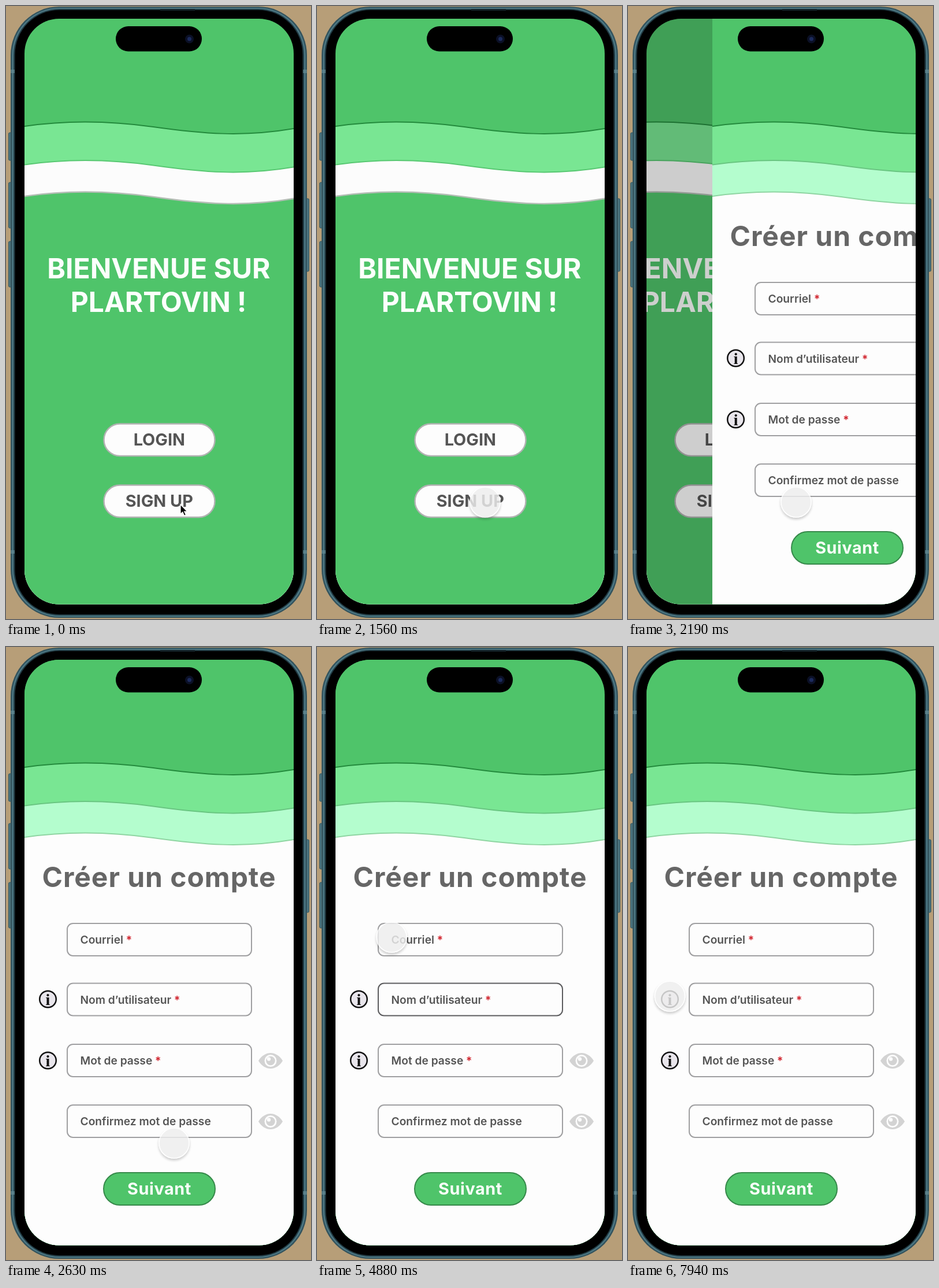
Animation, 528 px wide and 1060 px high, one loop 8000 ms. Source, as an HTML page:

```html
<!DOCTYPE html>
<html lang="fr">
<head>
<meta charset="utf-8">
<style>
html, body { margin: 0; width: 100%; height: 100%; overflow: hidden; background: #b79e78; }
svg { display: block; width: 528px; height: 1060px; font: 600 19.2px Inter, sans-serif; }
.mid { text-anchor: middle; font-weight: 700; }
.wide { letter-spacing: .02em; }
.big { font-size: 48px; }
.btn { font-size: 28.8px; }
.small { font-size: 15px; font-weight: 700; }
.red { fill: #d0202a; }
.pill { fill: #fdfdfd; stroke: #b2b2b2; stroke-width: 2.5; }
.box { fill: none; stroke-width: 2; }
</style>
</head>
<body>
<svg viewBox="0 0 528 1060">
  <defs>
    <clipPath id="screen"><rect x="32" y="22" width="466" height="1012.5" rx="60"/></clipPath>
    <path id="wave" d="M30 208.3L32 208C100 198 170 197 255 209S410 227 498 212L500 211.7V1100H30Z"/>
    <filter id="shade" x="-30%" y="-30%" width="160%" height="170%">
      <feDropShadow dx="0" dy="3" stdDeviation="2" flood-color="#000" flood-opacity=".25"/>
    </filter>
    <g id="info">
      <circle r="14.3" fill="#e9e6ec" stroke="#111" stroke-width="2.5"/>
      <text y="9.5" text-anchor="middle" font-family="Liberation Serif, serif" font-size="28" font-weight="700" fill="#111">i</text>
    </g>
    <g id="eye">
      <path d="M-21 0C-10 -18 10 -18 21 0C10 18 -10 18 -21 0Z" fill="#d3d3d3"/>
      <circle r="10.5" fill="#fdfdfd"/>
      <circle r="7.8" fill="#d3d3d3"/>
      <circle cx="-3" cy="-3" r="3.2" fill="#fdfdfd"/>
    </g>
  </defs>

  <g fill="#4b737e" stroke="#35565f">
    <rect x="4.5" y="219" width="7" height="48" rx="2"/>
    <rect x="4.5" y="305" width="7" height="79" rx="2"/>
    <rect x="4.5" y="407" width="7" height="79" rx="2"/>
    <rect x="517" y="333" width="7.5" height="126" rx="2"/>
  </g>
  <rect x="8" y="1" width="513" height="1057" rx="84" fill="#33535d"/>
  <rect x="10.5" y="3" width="508" height="1053" rx="82" fill="#4d7884"/>
  <rect x="13" y="5" width="503" height="1049" rx="80" fill="#223c45"/>
  <path d="M8 113H15M514 113H521M8 944H15M514 944H521" stroke="#6b919a" stroke-width="6" opacity=".6"/>
  <rect x="15.5" y="7" width="498" height="1045" rx="77"/>

  <g clip-path="url(#screen)">
    <g id="welcome">
      <rect x="30" y="20" width="470" height="1016" fill="#4fc46a"/>
      <use href="#wave" fill="#79e693" stroke="#238a3c" stroke-width="2"/>
      <use href="#wave" y="66.5" fill="#fcfcfc" stroke="#58c872" stroke-width="2"/>
      <use href="#wave" y="121" fill="#4fc46a" stroke="#b4bdb5" stroke-width="2.5"/>
      <g class="mid big" fill="#fcfffc">
        <text x="264.5" y="471">BIENVENUE SUR</text>
        <text x="264" y="529">PLARTOVIN !</text>
      </g>
      <rect class="pill" x="169.5" y="722.5" width="192" height="55.5" rx="27.7"/>
      <rect class="pill" x="169.5" y="828.5" width="192" height="55.5" rx="27.7"/>
      <g class="mid btn" fill="#555">
        <text x="265.3" y="760">LOGIN</text>
        <text x="265.3" y="866">SIGN UP</text>
      </g>
    </g>
    <rect id="dim" x="30" y="20" width="470" height="1016"/>
    <g id="signup">
      <rect x="32" y="20" width="468" height="1016" fill="#4fc46a"/>
      <svg x="32" y="0" width="468" height="1060" viewBox="32 0 468 1060" style="width:468px">
        <use href="#wave" fill="#79e693" stroke="#238a3c" stroke-width="2"/>
        <use href="#wave" y="66.5" fill="#b4fdce" stroke="#69c581" stroke-width="2"/>
        <use href="#wave" y="121" fill="#fdfdfd" stroke="#8fd5a2" stroke-width="2"/>
      </svg>
      <text class="mid wide big" x="265" y="415" fill="#666">Créer un compte</text>
      <g id="fields"></g>
      <g id="focus" fill="#29338c">
        <path class="box" stroke="#29338c" d="M122 478H116a10 10 0 0 0-10 10V524a10 10 0 0 0 10 10H415a10 10 0 0 0 10-10V488a10 10 0 0 0-10-10H203"/>
        <text class="small" x="128" y="483">Courriel <tspan class="red">*</tspan></text>
      </g>
      <use href="#info" x="72.5" y="609"/>
      <use href="#info" x="72.5" y="715"/>
      <use href="#eye" x="458" y="715.5"/>
      <use href="#eye" x="458" y="820.5"/>
      <rect x="169" y="909" width="193" height="56" rx="28" fill="#4fc46a" stroke="#36894a" stroke-width="2"/>
      <text class="mid wide btn" x="265.5" y="947" fill="#fafffa">Suivant</text>
    </g>
  </g>

  <rect x="190" y="35" width="149" height="43.5" rx="21.7"/>
  <circle cx="317.5" cy="57" r="7.5" fill="#0b1026"/>
  <circle cx="317.5" cy="57" r="3.5" fill="#1c2a5c"/>
  <path d="M267 6.5H327" stroke="#15252b" stroke-width="3"/>

  <path id="arrow" d="M0 0V16.5L3.8 13L6.6 19.3L9.4 18L6.7 12H11.8Z" fill="#000" stroke="#fff" stroke-width="1.2"/>
  <circle id="touch" r="26" fill="#eeeeee" stroke="#fff" stroke-width="1.6" opacity=".82" filter="url(#shade)"/>
</svg>
<script>
const LOOP = 8000, ARROW_END = 700, HOVER_LAG = 120;
const SLIDE_AT = 1981, SLIDE_MS = 380, FOCUS_ON = 5700, FOCUS_OFF = 6900;
const $ = id => document.getElementById(id);

// pointer path: time, x, y
const path = [
  [0, 302, 862], [700, 302, 862], [900, 291, 858], [4400, 291, 858],
  [4880, 129, 502], [5500, 249, 500], [6560, 249, 500],
  [7320, 79, 577], [7700, 72.5, 604], [LOOP, 72.5, 604]
];

const fields = [
  [478, 'Courriel', true], [581.5, 'Nom d’utilisateur', true],
  [687, 'Mot de passe', true], [792, 'Confirmez mot de passe', false]
];

$('fields').innerHTML = fields.map(([y, label, needed]) => `<g>
  <rect class="box" x="106" y="${y}" width="319" height="56" rx="10"/>
  <text x="128.5" y="${y + 35}" fill="#555">${label}${needed ? ' <tspan class="red">*</tspan>' : ''}</text>
</g>`).join('');
const groups = [...$('fields').children];

const clamp = v => Math.max(0, Math.min(1, v));
const show = (el, on) => el.setAttribute('visibility', on ? 'visible' : 'hidden');
const move = (el, x, y = 0) => el.setAttribute('transform', `translate(${x} ${y})`);

function pointer(t) {
  const i = Math.max(1, path.findIndex(k => k[0] > t));
  const [a, b] = [path[i - 1], path[i]];
  const p = clamp((t - a[0]) / (b[0] - a[0]));
  return [a[1] + (b[1] - a[1]) * p, a[2] + (b[2] - a[2]) * p];
}

function draw(t) {
  const slide = 1 - (1 - clamp((t - SLIDE_AT) / SLIDE_MS)) ** 1.75;
  move($('welcome'), -116.5 * slide);
  move($('signup'), 466 * (1 - slide));
  show($('signup'), slide > 0);
  $('dim').setAttribute('opacity', Math.min(.19, slide * .6));

  const focused = t >= FOCUS_ON && t < FOCUS_OFF;
  show($('focus'), focused);
  const [hx, hy] = pointer(Math.max(0, t - HOVER_LAG));
  groups.forEach((g, i) => {
    const y = fields[i][0];
    const hover = hx > 105 && hx < 426 && hy > y && hy < y + 56;
    g.firstElementChild.setAttribute('stroke', hover ? '#5c5c5e' : '#9f9fa1');
    g.setAttribute('opacity', i === 0 && focused ? 0 : 1);
  });

  const [x, y] = pointer(t);
  move($('arrow'), x, y);
  move($('touch'), x, y);
  show($('arrow'), t < ARROW_END);
  show($('touch'), t >= ARROW_END);
}

const start = performance.now();
function tick() {
  draw((performance.now() - start) % LOOP);
  requestAnimationFrame(tick);
}
tick();
</script>
</body>
</html>
```
